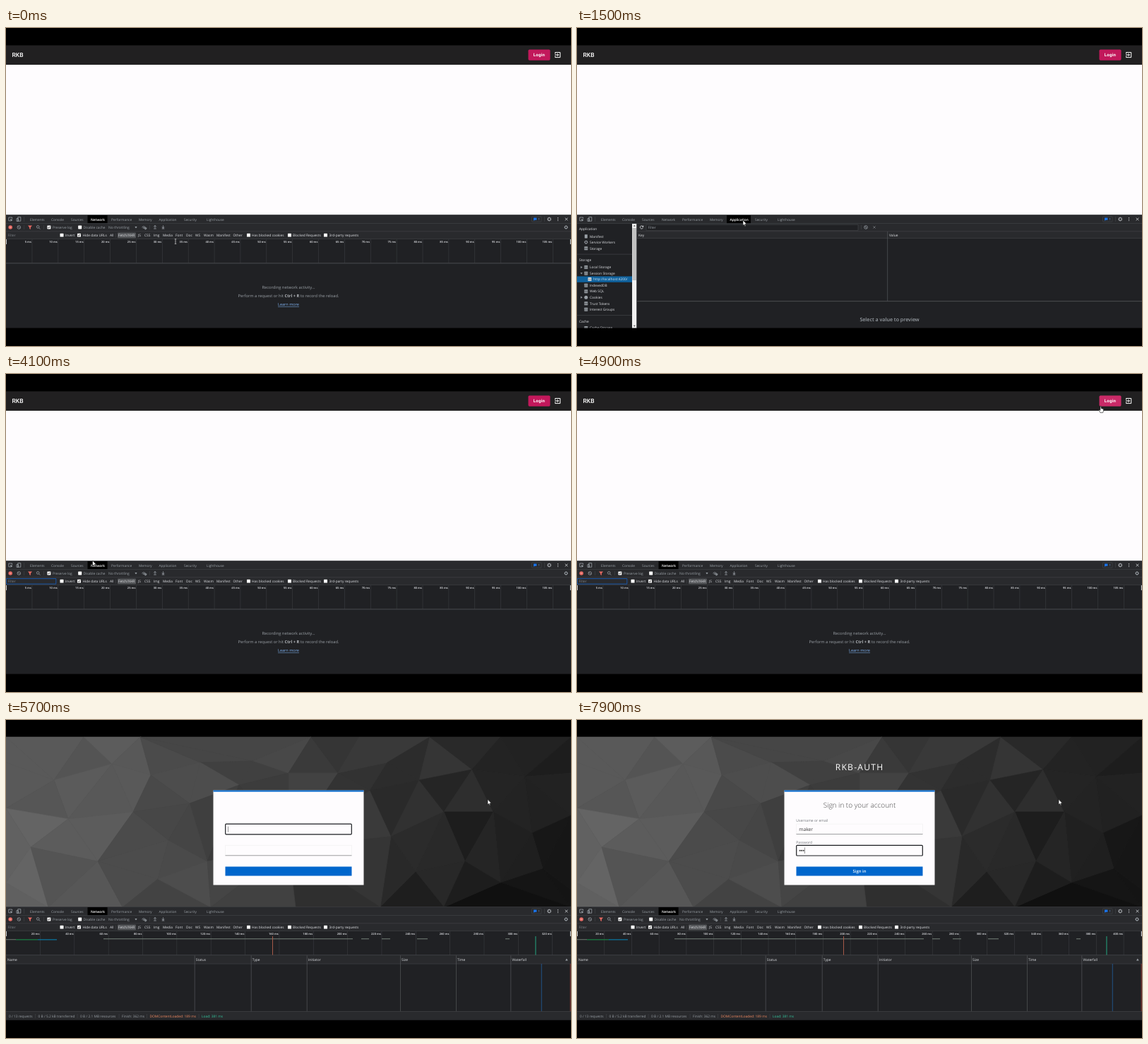
An HTML page with a canvas that plays this animation: 800x450 px, repeating every 8000 ms.

```html
<!DOCTYPE html>
<html lang="en">
<head>
<meta charset="utf-8">
<title>Login flow</title>
<style>
html, body { margin: 0; width: 100%; height: 100%; overflow: hidden; background: #000; }
canvas { display: block; }
</style>
</head>
<body>
<canvas id="stage" width="800" height="450"></canvas>
<script>
const LOOP = 8000, STEP = 100;
const SANS = '"Open Sans", sans-serif', ROBOTO = 'Roboto, sans-serif';
const GREY = '#9aa0a6', LIGHT = '#dfe1e5', PANEL = '#202124', BAR = '#292a2d', LINE = '#46484c';
const BRAND = 'RKB', USER = 'maker';
const ctx = document.getElementById('stage').getContext('2d');
ctx.textRendering = 'geometricPrecision';

// Times at which the interface changes
const AT = { storage: 1300, network: 3800, hover: 4800, click: 5100, record: 5300, bars: 5500,
  auth: 5700, text: 6300, type: 6800, password: 7300 };

function rect(x, y, w, h, color, c = ctx) { c.fillStyle = color; c.fillRect(x, y, w, h); }
function round(x, y, w, h, r, color) {
  ctx.fillStyle = color;
  ctx.beginPath(); ctx.roundRect(x, y, w, h, r); ctx.fill();
}
function frame(x, y, w, h, color, width = 1, r = 0) {
  ctx.strokeStyle = color; ctx.lineWidth = width;
  ctx.beginPath(); ctx.roundRect(x, y, w, h, r); ctx.stroke();
}
function path(points, color, width = 0.8, fill = false) {
  ctx.beginPath();
  points.forEach(([x, y], i) => i ? ctx.lineTo(x, y) : ctx.moveTo(x, y));
  if (fill) { ctx.closePath(); ctx.fillStyle = color; ctx.fill(); }
  else { ctx.strokeStyle = color; ctx.lineWidth = width; ctx.stroke(); }
}
function ring(x, y, r, color, width = 0.8) {
  ctx.strokeStyle = color; ctx.lineWidth = width;
  ctx.beginPath(); ctx.arc(x, y, r, 0, 7); ctx.stroke();
}
function disc(x, y, r, color) {
  ctx.fillStyle = color;
  ctx.beginPath(); ctx.arc(x, y, r, 0, 7); ctx.fill();
}
// y is the middle of the capital letters
function text(s, x, y, color = GREY, size = 4.85, { weight = 400, align = 'left', family = SANS, spacing = 0 } = {}) {
  ctx.font = `${weight} ${size}px ${family}`;
  ctx.letterSpacing = spacing + 'px';
  ctx.textAlign = align;
  ctx.fillStyle = color;
  ctx.fillText(s, x, y + size * 0.357);
  return ctx.measureText(s).width;
}

// Icons
function cross(x, y, r, color) {
  path([[x - r, y - r], [x + r, y + r]], color);
  path([[x + r, y - r], [x - r, y + r]], color);
}
function gear(x, y, color = GREY, r = 2) {
  ring(x, y, r, color, 1);
  for (let i = 0; i < 8; i++) {
    const a = i * Math.PI / 4;
    path([[x + r * Math.cos(a), y + r * Math.sin(a)],
      [x + (r + 1) * Math.cos(a), y + (r + 1) * Math.sin(a)]], color);
  }
}
function ban(x, y) { ring(x, y, 2.3, GREY); path([[x - 1.6, y - 1.6], [x + 1.6, y + 1.6]], GREY); }
function checkbox(x, y, on) {
  round(x, y - 2.4, 5, 4.8, 0.6, '#fff');
  if (on) path([[x + 1, y], [x + 2.1, y + 1.2], [x + 4, y - 1.2]], '#333', 0.9);
}
function arrow(x, y, dir) {
  path([[x, y - 2], [x, y + 2]], GREY);
  path([[x - 1.8, y], [x, y + dir * 2], [x + 1.8, y]], GREY);
  path([[x - 1.8, y + 2.6], [x + 1.8, y + 2.6]], GREY);
}
function triangle(x, y, open) {
  path(open ? [[x - 1.6, y - 1], [x + 1.6, y - 1], [x, y + 1.4]]
    : [[x - 1, y - 1.6], [x + 1.4, y], [x - 1, y + 1.6]], GREY, 0, true);
}
function cells(x, y, color = GREY) {
  round(x - 2.5, y - 2.5, 5, 5, 0.6, color);
  rect(x - 2.5, y - 0.9, 5, 0.4, PANEL);
  rect(x - 2.5, y + 0.7, 5, 0.4, PANEL);
}

// Low-poly backdrop: Delaunay triangles over a few points
const mesh = [0,24, 800,24, 0,265, 800,265, 0,60, 68,85, 110,24, 150,62, 205,78, 190,24, 275,60,
  330,92, 350,58, 432,24, 400,75, 470,75, 515,100, 500,24, 540,60, 600,24, 585,85, 620,130,
  545,165, 660,70, 700,24, 690,130, 735,80, 800,75, 745,160, 800,135, 650,200, 580,215, 530,265,
  700,230, 760,210, 800,240, 620,265, 0,125, 88,140, 35,180, 0,230, 60,265, 130,200, 180,130,
  230,170, 165,265, 215,225, 285,200, 290,265, 260,118, 400,180, 410,265];
function makeBackdrop() {
  const canvas = document.createElement('canvas');
  canvas.width = 800; canvas.height = 450;
  const c = canvas.getContext('2d');
  rect(0, 24, 800, 241, '#444', c);
  const pts = [];
  for (let i = 0; i < mesh.length; i += 2) pts.push([mesh[i], mesh[i + 1]]);
  const n = pts.length;
  for (let i = 0; i < n; i++) for (let j = i + 1; j < n; j++) for (let k = j + 1; k < n; k++) {
    const [a, b, d] = [pts[i], pts[j], pts[k]];
    const det = 2 * (a[0] * (b[1] - d[1]) + b[0] * (d[1] - a[1]) + d[0] * (a[1] - b[1]));
    if (!det) continue;
    const [qa, qb, qd] = [a, b, d].map(p => p[0] ** 2 + p[1] ** 2);
    const x = (qa * (b[1] - d[1]) + qb * (d[1] - a[1]) + qd * (a[1] - b[1])) / det;
    const y = (qa * (d[0] - b[0]) + qb * (a[0] - d[0]) + qd * (b[0] - a[0])) / det;
    const r = Math.hypot(a[0] - x, a[1] - y);
    if (pts.some(p => Math.hypot(p[0] - x, p[1] - y) < r - 1e-6)) continue;
    const mx = (a[0] + b[0] + d[0]) / 3, my = (a[1] + b[1] + d[1]) / 3;
    const noise = Math.sin(mx * 12.9 + my * 78.2) * 7;
    const v = Math.max(12, Math.round(97 - mx * 0.078 - mx * (my - 25) * 0.00012 + noise));
    c.fillStyle = c.strokeStyle = `rgb(${v},${v},${v})`;
    c.lineWidth = 0.6;
    c.beginPath();
    c.moveTo(...a); c.lineTo(...b); c.lineTo(...d); c.closePath();
    c.fill(); c.stroke();
  }
  return canvas;
}
const backdrop = makeBackdrop();

function drawHome(t) {
  rect(0, 24.5, 800, 27.5, '#212021');
  rect(0, 52, 800, 213, '#fefcfe');
  text(BRAND, 8.5, 38.3, '#fff', 8.5, { weight: 500, family: ROBOTO });
  const pink = t >= AT.click ? '#d13c75' : t >= AT.hover ? '#c92a67' : '#c2185b';
  round(739.5, 30.5, 31, 15.3, 1.7, pink);
  text('Login', 755, 38, '#fff', 6.1, { weight: 700, align: 'center', family: ROBOTO, spacing: 0.25 });
  path([[777.6, 36.5], [777.6, 34.5], [784.7, 34.5], [784.7, 41.6], [777.6, 41.6], [777.6, 39.6]], '#fff', 1);
  path([[777, 38], [782.2, 38]], '#fff', 1);
  path([[780.4, 36], [782.4, 38], [780.4, 40]], '#fff', 1);
}

function input(y, focused, value) {
  if (focused) frame(310.7, y, 178.6, 14.6, '#1b1d21', 1.2, 1);
  else {
    frame(310.5, y, 179, 14.5, '#eeeeee', 0.6);
    rect(310.5, y + 14, 179, 0.8, '#8b8d8f');
  }
  const w = text(value, 314.3, y + 7.5, '#363636', 6.7);
  if (focused) rect(314.3 + (value ? w + 0.3 : 0), y + 3.5, 0.5, 8, '#333');
}

function drawAuth(t) {
  ctx.drawImage(backdrop, 0, 0);
  rect(293.5, 99.5, 213, 134, '#fefcfe');
  rect(293.5, 99.5, 213, 2, '#0066cc');
  const inPassword = t >= AT.password;
  const typed = Math.max(0, Math.min(USER.length, Math.floor((t - AT.type) / STEP) + 1));
  const dots = [7600, 7700, 7900].filter(k => t >= k).length;
  input(147.2, !inPassword, USER.slice(0, typed));
  input(177.4, inPassword, '');
  if (dots) {
    rect(314, 180, 1, 9, '#fefcfe');
    for (let i = 0; i < dots; i++) disc(315.7 + i * 2.5, 184.8, 0.95, '#222');
    rect(314.6 + dots * 2.5, 180.5, 0.5, 8.5, '#333');
  }
  rect(310.5, 207.5, 179, 13, '#0066cc');
  if (t < AT.text) return;
  text(BRAND + '-AUTH', 400, 67, '#fff', 12.1, { align: 'center', spacing: 1.25 });
  text('Sign in to your account', 400, 120.3, '#444', 10, { weight: 300, align: 'center' });
  text('Username or email', 310.3, 142.3, '#72767b', 5.05);
  text('Password', 310.3, 172.7, '#72767b', 5.05);
  text('Sign in', 400, 213.8, '#fff', 5.9, { weight: 600, align: 'center' });
}

const tabs = [['Elements', 34], ['Console', 64], ['Sources', 92], ['Network', 120], ['Performance', 149],
  ['Memory', 188], ['Application', 216.5], ['Security', 252], ['Lighthouse', 284]];
function drawTabs(active, hovered) {
  rect(0, 264.5, 800, 160, PANEL);
  rect(0, 264.5, 800, 12, BAR);
  rect(0, 264.5, 800, 0.5, LINE);
  for (const [name, x] of tabs) {
    ctx.font = `4.8px ${SANS}`; ctx.letterSpacing = '0px';
    const w = ctx.measureText(name).width;
    if (name === active) rect(x - 4.5, 265, w + 9, 11.5, '#000');
    else if (name === hovered) rect(x - 2.5, 265, w + 5, 11.5, '#36373b');
    text(name, x, 270.8, name === active ? '#fff' : name === hovered ? LIGHT : GREY, 4.8,
      { weight: name === active ? 600 : 400 });
  }
  rect(0, 276.3, 800, 0.6, LINE);
  path([[7, 272.8], [3.8, 272.8], [3.8, 268], [8.6, 268], [8.6, 270]], GREY);
  path([[5.8, 270], [9.4, 271.4], [7.4, 273.6]], GREY, 0, true);
  frame(16.8, 267.6, 4, 5.6, GREY, 0.8);
  frame(15, 269.6, 2.6, 3.8, GREY, 0.8);
  rect(25.5, 267, 0.5, 7, LINE);
  frame(744.5, 266.8, 13.5, 7.4, LINE, 0.6, 0.6);
  rect(747, 268.5, 4.4, 3.3, '#1a73e8');
  path([[747, 271], [747, 273], [749, 271]], '#1a73e8', 0, true);
  text('1', 753.5, 270.6, '#7fa9df', 4.4);
  rect(762, 267, 0.5, 7, LINE);
  gear(769.2, 270.5, '#b5b9be');
  for (const y of [268.5, 270.5, 272.5]) disc(781.5, y, 0.6, LIGHT);
  cross(793.5, 270.5, 1.8, LIGHT);
}

const filters = [['All', 147], ['Fetch/XHR', 159], ['JS', 187], ['CSS', 196], ['Img', 209], ['Media', 222],
  ['Font', 240], ['Doc', 255], ['WS', 268], ['Wasm', 280], ['Manifest', 298], ['Other', 321.5]];
const checks = [['Invert', 76.5, 84, 0], ['Hide data URLs', 101, 108.5, 1], ['Has blocked cookies', 341, 348, 0],
  ['Blocked Requests', 399, 406, 0], ['3rd-party requests', 450, 457.5, 0]];
function drawNetworkTools(t) {
  rect(0, 277, 800, 21.5, BAR);
  rect(0, 287.6, 800, 0.5, LINE);
  disc(6.2, 282, 2.8, '#e46962');
  disc(6.2, 282, 1, '#f3a19b');
  ban(18.3, 282);
  rect(25.5, 279, 0.5, 6, LINE);
  path([[31, 279.6], [37, 279.6], [34.8, 282.3], [34.8, 285], [33.2, 284], [33.2, 282.3]], '#e46962', 0, true);
  ring(45.2, 281.4, 1.8, GREY);
  path([[46.5, 282.7], [48.3, 284.6]], GREY);
  rect(53, 279, 0.5, 6, LINE);
  checkbox(58.4, 282, true);
  text('Preserve log', 66, 282.2);
  checkbox(102.2, 282, false);
  text('Disable cache', 109.5, 282.2);
  text('No throttling', 145, 282.2, GREY, 5);
  triangle(184, 282, true);
  for (const r of [1.6, 3.2]) {
    ctx.beginPath(); ctx.arc(195, 284, r, -2.5, -0.64);
    ctx.strokeStyle = GREY; ctx.lineWidth = 0.8; ctx.stroke();
  }
  disc(195, 283.5, 0.6, GREY);
  gear(197.6, 283.6, GREY, 0.8);
  rect(203, 279, 0.5, 6, LINE);
  arrow(211, 281.4, -1);
  arrow(222.5, 281.4, 1);
  gear(793, 282, GREY, 1.8);
  text('Filter', 2.5, 293.6, '#7d8187', 4.8);
  if (t >= AT.network && t < AT.click) frame(0.4, 289.6, 70.4, 7.5, '#1662c4', 0.8);
  for (const [label, bx, x, on] of checks) {
    checkbox(bx, 293.2, on);
    text(label, x, 293.4, LIGHT);
  }
  rect(155, 290.5, 0.5, 6, LINE);
  round(158, 289.6, 26, 7.6, 1, '#55575a');
  for (const [label, x] of filters) text(label, x, 293.4, LIGHT);
}

function drawTimeline(unit, spacing) {
  rect(0, 298.4, 800, 0.5, LINE);
  for (let i = 1; i * spacing < 780; i++) {
    const x = i * spacing;
    rect(x - 0.2, 299, 0.6, 33.5, '#3b3d41');
    text(`${i * unit} ms`, x - 1, 303, LIGHT, 4.05, { weight: 600, align: 'right' });
  }
  rect(0, 332.5, 800, 0.8, '#55575b');
  rect(0, 299, 1, 7, '#c4c7ca');
  rect(798.8, 299, 1.2, 7, '#c4c7ca');
}

function drawBars(auth) {
  const [a, b, c] = auth ? [14, 45, 72] : [18, 56, 90];
  rect(0, 310.3, a, 0.9, '#76847a');
  rect(a, 310.3, b - a, 1.1, '#178a48');
  rect(b, 310.3, c - b, 1.1, '#087fae');
  const spans = auth ? [[138, 491], [503, 514], [532, 544], [582, 597], [707, 713]] : [[173, 698]];
  for (const [x0, x1] of spans) rect(x0, 309.3, x1 - x0, 0.9, '#7d8a80');
  rect(auth ? 377 : 471.5, 306, 0.9, 26.5, '#b5604d');
  if (auth) rect(749.5, 306, 0.9, 26.5, '#25b58c');
}

const columns = [['Name', 0], ['Status', 266.8], ['Type', 346.8], ['Initiator', 425.8], ['Size', 558],
  ['Time', 637], ['Waterfall', 714.5]];
function drawTable(auth, filled) {
  rect(0, 333.3, 800, 11.5, BAR);
  rect(0, 344.7, 800, 0.6, LINE);
  for (const [name, x] of columns) {
    text(name, x + 2, 339.4, LIGHT, 4.9);
    if (x) rect(x, 333.3, 0.7, 79, '#54565a');
  }
  path([[792, 340.5], [795.6, 340.5], [793.8, 337.6]], GREY, 0, true);
  if (filled) {
    if (!auth) rect(743.5, 345, 0.6, 67.5, '#37393d');
    rect(auth ? 757.8 : 772.5, 345, 0.8, 67.5, '#22619f');
    if (auth) rect(798.7, 345, 0.9, 67.5, '#963b33');
  }
  rect(0, 412.4, 800, 12.1, BAR);
  rect(0, 412.2, 800, 0.6, LINE);
  if (!filled) return text('0 / 1 requests', 4, 419);
  const parts = auth
    ? [['0 / 13 requests', 4], ['0 B / 5.2 kB transferred', 45.5], ['0 B / 2.1 MB resources', 105], ['Finish: 362 ms', 164],
      ['DOMContentLoaded: 189 ms', 203.5, '#f28b62'], ['Load: 381 ms', 277, '#35c9a0']]
    : [['0 / 9 requests', 4], ['0 B / 5.2 kB transferred', 43], ['0 B / 1.7 MB resources', 102.5], ['Finish: 282 ms', 161],
      ['DOMContentLoaded: 189 ms', 201, '#f28b62']];
  parts.forEach(([s, x, color], i) => {
    text(s, x, 419, color);
    if (i) rect(x - 4.2, 416, 0.5, 6, LINE);
  });
}

function drawNetwork(t) {
  drawNetworkTools(t);
  const auth = t >= AT.auth;
  if (!auth) drawTimeline(5, 36.87);
  else if (t < AT.text) drawTimeline(20, 48.35);
  else drawTimeline(20, 38.7);
  if (t >= AT.record) {
    if (t >= AT.bars) drawBars(auth);
    drawTable(auth, t >= AT.bars);
    return;
  }
  const center = { align: 'center' };
  text('Recording network activity...', 400, 367.2, GREY, 5.75, center);
  const hint = [['Perform a request or hit ', 400], ['Ctrl + R', 700], [' to record the reload.', 400]];
  const widths = hint.map(([s, weight]) => {
    ctx.font = `${weight} 5.75px ${SANS}`;
    return ctx.measureText(s).width;
  });
  let x = 400 - widths.reduce((a, b) => a + b) / 2;
  hint.forEach(([s, weight], i) => {
    text(s, x, 379.3, weight > 400 ? '#b4b8bd' : GREY, 5.75, { weight });
    x += widths[i];
  });
  const w = text('Learn more', 400, 391.3, '#7fb2f0', 5.55, center);
  rect(400 - w / 2, 394, w, 0.5, '#7fb2f0');
}

const tree = [['Manifest', 294.8], ['Service Workers', 303.2], ['Storage', 311.8], ['Local Storage', 338.6, 'closed'],
  ['Session Storage', 347.2, 'open'], ['IndexedDB', 364.2], ['Web SQL', 372.7], ['Cookies', 381.2, 'closed'],
  ['Trust Tokens', 389.8], ['Interest Groups', 398.2], ['Cache Storage', 424.6]];
function drawStorage() {
  ctx.save();
  ctx.beginPath(); ctx.rect(0, 277, 800, 147.5); ctx.clip();
  for (const [name, y] of [['Application', 284.5], ['Storage', 328.5], ['Cache', 414.8]]) text(name, 3, y, LIGHT);
  for (const y of [319.8, 406.3]) rect(0, y, 78, 0.6, LINE);
  rect(0, 351.4, 78, 8.4, '#10629d');
  for (const [name, y, state] of tree) {
    text(name, 18, y, LIGHT);
    if (name === 'Service Workers') gear(12.8, y, GREY, 1.7);
    else if (name === 'Cookies') disc(12.8, y, 2.5, GREY);
    else if (name === 'Manifest') round(10.8, y - 2.6, 4, 5.2, 0.4, GREY);
    else cells(12.8, y);
    if (state) triangle(6.3, y, state === 'open');
  }
  cells(18, 355.6, '#e8eaed');
  text('http://localhost:4200/', 23, 355.6, '#d7e7f5');
  rect(78, 277, 6.4, 148, '#f1f1f1');
  rect(78.4, 283, 5.6, 74, '#c1c1c1');
  path([[79.8, 280.8], [82.8, 280.8], [81.3, 278.8]], '#555', 0, true);
  path([[79.8, 420.8], [82.8, 420.8], [81.3, 422.8]], '#555', 0, true);
  rect(84.4, 277, 0.6, 148, LINE);

  rect(85, 277, 715, 20, BAR);
  ctx.beginPath(); ctx.arc(91.5, 282, 2.1, 0.4, 5.5);
  ctx.strokeStyle = LIGHT; ctx.lineWidth = 0.8; ctx.stroke();
  path([[94.2, 279.3], [94.2, 281.7], [91.8, 281.7]], LIGHT, 0, true);
  rect(98, 278.2, 300, 8.4, PANEL);
  frame(98, 278.2, 300, 8.4, '#45474b', 0.6);
  text('Filter', 100.5, 282.7, GREY, 4.8);
  rect(402, 279, 0.5, 6, LINE);
  ban(409, 282);
  cross(421, 282, 1.6, '#777a7f');
  rect(85, 287.6, 715, 0.5, LINE);
  text('Key', 87, 293.2, LIGHT, 4.9);
  text('Value', 442, 293.2, LIGHT, 4.9);
  rect(85, 297.2, 715, 0.6, LINE);
  rect(439.4, 288, 0.7, 98.5, '#54565a');
  rect(85, 386.3, 715, 0.8, '#54565a');
  text('Select a value to preview', 442.5, 412, GREY, 7.1, { weight: 600, align: 'center' });
  ctx.restore();
}

// Pointer path: time, x, y
const route = [[0, 240, 302], [100, 239, 250], [200, 238, 218], [400, 238, 218], [600, 234, 224], [900, 227, 250],
  [1000, 227, 250], [1200, 232, 266], [1500, 235, 272], [2600, 235, 272], [2900, 130, 330], [3100, 68, 349],
  [3200, 68, 335], [3400, 91, 268], [3700, 120, 268], [4000, 120, 268], [4200, 125, 260], [4400, 160, 235],
  [4700, 640, 75], [4900, 741.5, 45.5], [5100, 748, 40], [5300, 748, 40], [5600, 684.4, 112], [5700, 682, 112.3]];
function pointerAt(t) {
  const i = route.findIndex(p => p[0] > t);
  if (i < 0) return route[route.length - 1].slice(1);
  const [t0, x0, y0] = route[i - 1], [t1, x1, y1] = route[i];
  const k = (t - t0) / (t1 - t0);
  return [x0 + (x1 - x0) * k, y0 + (y1 - y0) * k];
}
function drawPointer(t, x, y) {
  if (t < 100) {
    rect(x - 0.4, y - 3.4, 0.8, 7, '#d0d0d0');
    rect(x - 1.3, y - 3.6, 2.6, 0.6, '#d0d0d0');
    rect(x - 1.3, y + 3.2, 2.6, 0.6, '#d0d0d0');
    return;
  }
  const hand = t >= AT.hover && t <= AT.record;
  const shape = hand
    ? [[-0.5, 0], [0.5, 0], [0.8, 3.2], [3.8, 4], [4, 6.5], [3.2, 9.2], [-0.6, 9.2], [-2.6, 6], [-2, 5.2], [-0.7, 6]]
    : [[0, 0], [0, 7.5], [1.7, 6], [2.9, 8.7], [4, 8.2], [2.9, 5.6], [5.2, 5.5]];
  const points = shape.map(([dx, dy]) => [x + dx, y + dy]);
  path(points, '#fff', 0, true);
  path([...points, points[0]], '#111', 0.6);
}

const hovers = [[1100, 1300, 'Application'], [3400, 3500, 'Console'], [3500, 3600, 'Sources'], [3600, 3800, 'Network']];
function draw(t) {
  rect(0, 0, 800, 450, '#000');
  if (t >= AT.auth) drawAuth(t); else drawHome(t);
  const storage = t >= AT.storage && t < AT.network;
  const hover = hovers.find(([from, to]) => t >= from && t < to);
  drawTabs(storage ? 'Application' : 'Network', hover && hover[2]);
  if (storage) drawStorage(); else drawNetwork(t);
  drawPointer(t, ...pointerAt(t));
}

const start = performance.now();
function tick() {
  const t = (performance.now() - start) % LOOP;
  draw(Math.floor(t / STEP) * STEP);
  requestAnimationFrame(tick);
}
tick();
</script>
</body>
</html>
```
